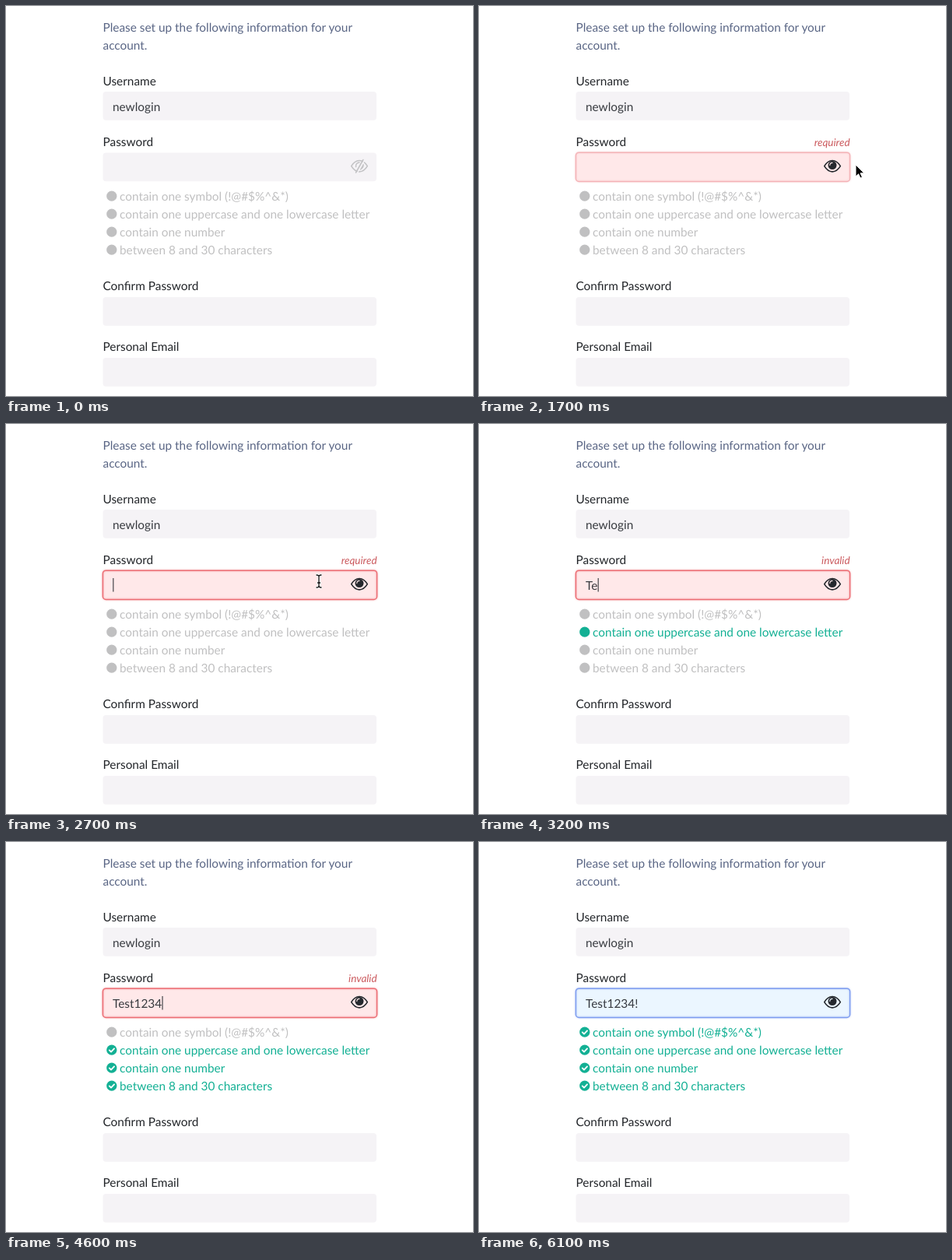
Recreate the animation shown at these times as an HTML page. Size 600x501 px, loop 6200 ms.

```html
<!DOCTYPE html>
<html lang="en">
<head>
<meta charset="utf-8">
<title>Password rules</title>
<style>
  html, body { margin: 0; width: 100%; height: 100%; overflow: hidden; background: #fff; }
  svg { display: block; width: 600px; height: 501px; font: 15.38px Lato, sans-serif; fill: #23262a; text-rendering: geometricPrecision; }
  .intro { fill: #5a6685; }
  .box { fill: #f5f3f6; }
  .value { fill: #383b40; }
  .error { font-size: 13.5px; font-style: italic; fill: #cb5a5e; text-anchor: end; }
  .line { fill: none; stroke-linecap: round; stroke-linejoin: round; }
</style>
</head>
<body>
<svg viewBox="0 0 600 501">
  <defs>
    <filter id="soft" x="-5%" y="-30%" width="110%" height="160%"><feGaussianBlur stdDeviation="0.8"/></filter>
    <path id="lens" d="M443.7 205.7C446.5 201 450 198.5 454 198.5S461.5 201 464.3 205.7C461.5 210.4 458 212.9 454 212.9S446.5 210.4 443.7 205.7Z"/>
  </defs>
  <g class="intro">
    <text x="124.5" y="33">Please set up the following information for your</text>
    <text x="124.5" y="56">account.</text>
  </g>
  <g id="form"></g>
  <g class="line">
    <rect id="glow" x="124.4" y="188.2" width="352.2" height="37.2" rx="4" stroke-width="2.2" filter="url(#soft)"/>
    <rect id="border" x="124.4" y="188.2" width="352.2" height="37.2" rx="4" stroke-width="1.5"/>
  </g>
  <text class="value" x="137" y="134.7">newlogin</text>
  <text class="value" id="typed" x="137" y="213"></text>
  <rect id="caret" y="198" width="1.1" height="17.5" fill="#34373c"/>
  <text class="error" id="error" x="476.6" y="179.6"></text>

  <g id="eyeOff" class="line" stroke="#c3c3c5" stroke-width="1.6">
    <use href="#lens"/>
    <path d="M449.6 206.5a4.6 4.6 0 0 1 4.4-5.6" stroke-width="1.5"/>
    <path d="M459.1 203.5a5.4 5.4 0 0 1-3.6 6.6Z" fill="#c3c3c5" stroke-width="1"/>
    <path id="slashGap" d="M460.6 198.2L451.4 214.4" stroke-width="1.5"/>
    <path d="M458.8 197.6L449.6 213.9" stroke-width="1.7"/>
  </g>
  <g id="eyeOn">
    <use href="#lens" class="line" stroke="#25292e" stroke-width="1.6"/>
    <circle cx="454" cy="204.6" r="5.5" fill="#25292e"/>
    <path id="glint" class="line" d="M450.8 204.6a3.2 3.2 0 0 1 3.2-3.2" stroke-width="1.1"/>
  </g>
  <g id="rules"></g>

  <g id="hand" stroke="#000" stroke-width="1.2" stroke-linejoin="round">
    <path fill="#fff" d="M-1.9 1.7Q-1.6 0 0 0Q1.4 0 1.8 1.7L3 6.4Q5 5.5 5.9 7Q7.9 6.3 8.5 7.9Q10.4 7.6 10.6 9.6L10.2 13L8.8 15.6V17.4H1.2Q.4 15-1.6 13L-4.5 9.4Q-4.8 7.4-2.8 7.6L-.6 9.5Z"/>
    <path class="line" stroke-width=".9" d="M3 6.4L3.5 9M5.9 7L6.2 9.2M8.5 7.9V9.6M2.8 12V15M5 12V15M7.2 12V15"/>
  </g>
  <g id="beam" class="line">
    <path d="M-3-8Q0-8 0-6Q0-8 3-8M0-6V6M-3 8Q0 8 0 6Q0 8 3 8M-1.5 2H1.5" stroke="#fff" stroke-width="3"/>
    <path d="M-3-8Q0-8 0-6Q0-8 3-8M0-6V6M-3 8Q0 8 0 6Q0 8 3 8M-1.5 2H1.5" stroke="#111" stroke-width="1.3"/>
  </g>
  <path id="arrow" d="M0 0V15L3.6 11.8L6 17L8.4 16L6 10.8H10.8Z" fill="#000" stroke="#fff" stroke-width="1"/>
</svg>
<script>
const LOOP = 6200, STEP = 100;
const $ = id => document.getElementById(id);
const BLUE = [124, 155, 239, 1], RED = [236, 108, 115, 1], ROSE = [244, 178, 182, 1];
const ICE = [235, 246, 255, 1], PINK = [255, 232, 233, 1], GREY = [245, 243, 246, 1];

const borderKeys = [[400, [124, 155, 239, 0]], [600, BLUE], [1400, BLUE], [1600, ROSE],
  [2200, ROSE], [2400, RED], [5300, RED], [5500, BLUE]];
const fillKeys = [[400, GREY], [600, ICE], [1400, ICE], [1600, PINK], [5100, PINK], [5300, ICE]];
const mouseKeys = [[500, [330, 208]], [900, [425, 212]], [1100, [438.7, 213.4]], [1300, [453, 207]],
  [1400, [453, 207]], [1600, [484, 204]], [1700, [484, 204]], [1900, [440, 203]], [2100, [402, 202]]];

// Each entry holds from its time until the next one.
const typedSteps = [[0, ""], [2800, "T"], [3100, "Te"], [3400, "Tes"], [3600, "Test"], [4000, "Test1"],
  [4100, "Test12"], [4300, "Test123"], [4400, "Test1234"], [5100, "Test1234!"]];
const errorSteps = [[0, ""], [1500, "required"], [2900, "invalid"], [5200, ""]];
const pointerSteps = [[0, ""], [500, "beam"], [1000, "hand"], [1600, "arrow"], [1800, "hand"],
  [1900, "beam"], [2800, ""]];
const caretSteps = [[0, 0], [600, 1], [1500, 0], [2100, 1], [5500, 0], [5800, 1], [6100, 0]];

const fields = [["Username", 102, 110], ["Password", 180, 188.5],
  ["Confirm Password", 365, 374], ["Personal Email", 443, 452]];
$("form").innerHTML = fields.map(([label, baseline, top]) =>
  `<text x="124.5" y="${baseline}">${label}</text>
   <rect class="box" x="124.5" y="${top}" width="351.5" height="36.8" rx="4"/>`).join("");
const box = document.querySelectorAll(".box")[1];

const rules = [["contain one symbol (!@#$%^&amp;*)", 5200],
  ["contain one uppercase and one lowercase letter", 3200],
  ["contain one number", 4100], ["between 8 and 30 characters", 4500]];
$("rules").innerHTML = rules.map(([label], i) =>
  `<g transform="translate(0 ${23 * i})"><circle cx="135.8" cy="244.2" r="6.6"/>
   <path class="line" d="M132.8 244.4l2.2 2.2 4-4.2" stroke="#fff" stroke-width="1.9"/>
   <text x="146" y="250">${label}</text></g>`).join("");
const ruleNodes = [...$("rules").children];

const held = (steps, t) => steps.filter(s => s[0] <= t).pop()[1];
function tween(keys, t) {
  const next = keys.findIndex(k => k[0] > t);
  if (next === 0) return keys[0][1];
  if (next < 0) return keys[keys.length - 1][1];
  const [t0, a] = keys[next - 1], [t1, b] = keys[next];
  const p = (t - t0) / (t1 - t0);
  return a.map((v, i) => v + (b[i] - v) * p);
}
const rgba = c => `rgba(${c.join(",")})`;
const show = (node, on) => { node.style.display = on ? "" : "none"; };

$("glow").style.opacity = 0.35;

function draw(t) {
  const fill = rgba(tween(fillKeys, t));
  $("border").style.stroke = $("glow").style.stroke = rgba(tween(borderKeys, t));
  box.style.fill = $("slashGap").style.stroke = $("glint").style.stroke = fill;

  $("typed").textContent = held(typedSteps, t);
  $("caret").setAttribute("x", 137.3 + $("typed").getComputedTextLength());
  show($("caret"), held(caretSteps, t));
  $("error").textContent = held(errorSteps, t);
  show($("eyeOff"), t < 1400);
  show($("eyeOn"), t >= 1400);

  ruleNodes.forEach((node, i) => {
    node.style.fill = t >= rules[i][1] ? "#13b094" : "#c0c0c1";
    show(node.children[1], t >= rules[i][1] + 100);
  });

  const kind = held(pointerSteps, t), [x, y] = tween(mouseKeys, t);
  for (const id of ["hand", "beam", "arrow"]) {
    show($(id), id === kind);
    $(id).setAttribute("transform", `translate(${x} ${y})`);
  }
}

const start = performance.now();
function tick(now) {
  const t = Math.max(0, now - start) % LOOP;
  draw(Math.floor(t / STEP) * STEP);
  requestAnimationFrame(tick);
}
draw(0);
requestAnimationFrame(tick);
</script>
</body>
</html>
```
